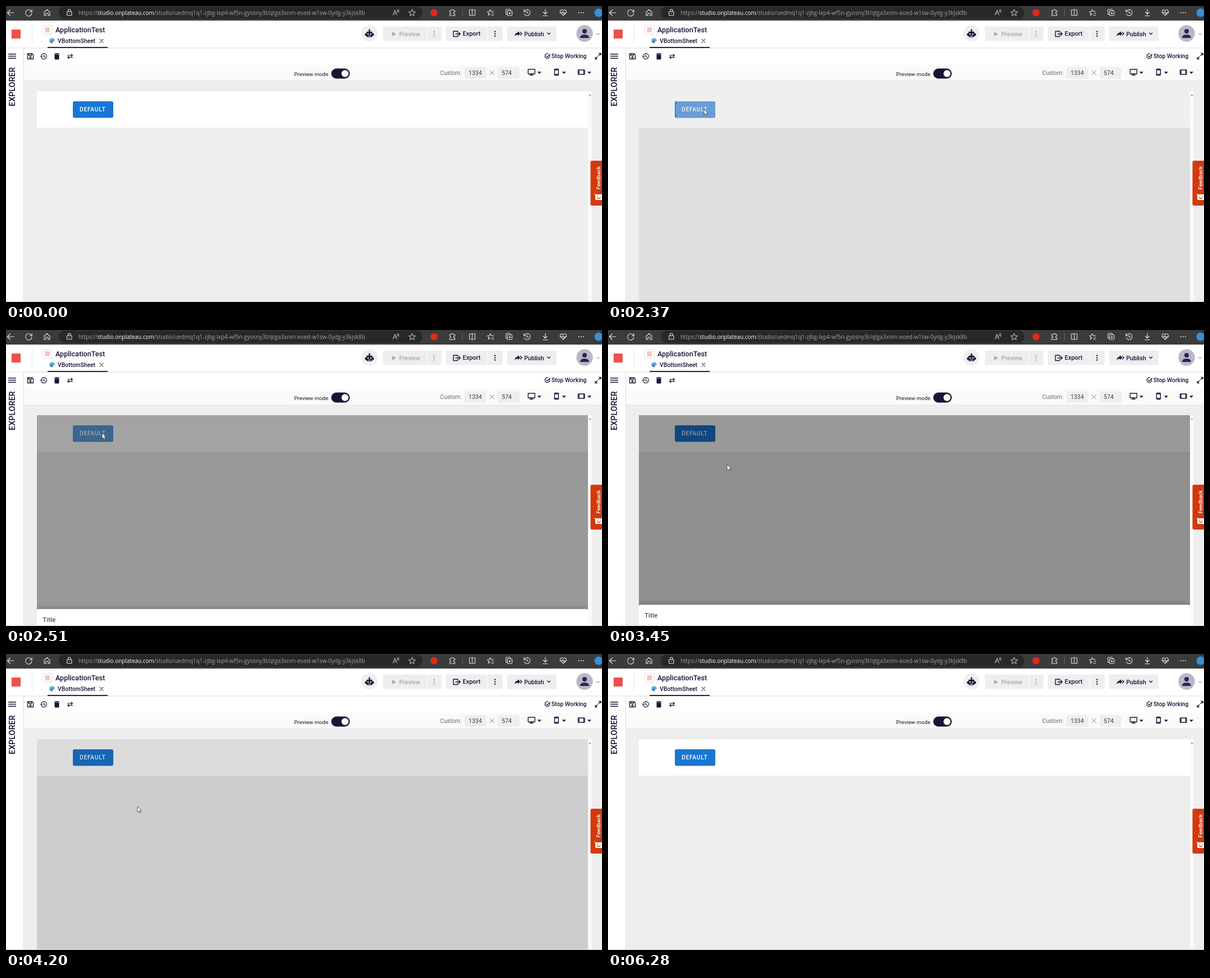
Animation of 1061x528 px, one loop 6410 ms. Source, as an HTML page:

```html
<!DOCTYPE html>
<html lang="en">
<head>
<meta charset="utf-8">
<title>Bottom sheet preview</title>
<style>
html, body { margin: 0; width: 100%; height: 100%; overflow: hidden; background: #eee; }
svg { display: block; width: 1061px; height: 528px; }
text { font-family: Roboto, sans-serif; fill: #1d1235; white-space: pre; }
.m { font-weight: 500; }
.url { font: 9.92px "Open Sans", sans-serif; fill: #a3a3a3; }
.line { fill: none; stroke-linecap: round; stroke-linejoin: round; }
.bar { stroke: #e4e4e4; stroke-width: 1.1; }
.ink { stroke: #1d1235; stroke-width: 1.4; }
</style>
</head>
<body>
<svg viewBox="0 0 1061 528">
  <defs>
    <clipPath id="btnClip"><rect x="119" y="170" width="72" height="29.5" rx="3"/></clipPath>
    <clipPath id="pageClip"><rect x="55" y="152" width="981" height="376"/></clipPath>
    <path id="star" d="M0-6 1.7-1.9 6-1.7 2.7 1.2 3.8 5.4 0 3-3.8 5.4-2.7 1.2-6-1.7-1.7-1.9Z"/>
    <path id="down" d="M-3.5-1.7H3.5L0 2Z" fill="#1d1235"/>
    <g id="dots"><circle cy="-4" r="1.2"/><circle r="1.2"/><circle cy="4" r="1.2"/></g>
  </defs>

  <!-- browser bar -->
  <rect width="1061" height="26" fill="#3b3b3b"/>
  <rect x="94" y="1" width="647" height="22" rx="11" fill="#282828"/>
  <g class="line bar">
    <path d="M3 12H14M7.5 7 2.5 12 7.5 17"/>
    <path d="M45.6 10.2A5.6 5.6 0 1 0 46 12.6M46.2 6.5V10.2H42.5"/>
    <path d="M68 11 73 6.4 78 11V17H75V13H71V17H68Z"/>
    <rect x="108.5" y="10" width="8.5" height="6.8" rx="1"/>
    <path d="M110.5 10V8.2A2.2 2.2 0 0 1 115 8.2V10M112.7 13V13.4"/>
    <path d="M689 16 692.5 7.5 696 16M690.3 13H694.8M696.5 7.5Q698 9 696.8 10.8M698 6Q700.2 8.6 698.6 11.4" stroke="#bbb"/>
    <use href="#star" x="723" y="12" stroke="#bbb"/>
    <path d="M790 8H793Q793 6 794.7 6T796.4 8H799V11Q796.8 11 796.8 12.6T799 14.2V17H790V14Q792 14 792 12.5T790 11Z"/>
    <path d="M812.5 6V18" stroke="#666"/>
    <path d="M828.5 7H825V16.5H828.5M831.5 7H835V16.5H831.5M830 5.5V18"/>
    <path d="M861.5 14 858.8 16.6 859.7 12.8 857 10.2 860.5 9.8 862 6.5 863.5 9.8H868M865 13H868M864 16.2H868"/>
    <path d="M892 15.5 890 14V7.5Q890 6 891.5 6H897L898.5 8"/>
    <rect x="892.5" y="8.5" width="8.5" height="8.5" rx="1.5"/>
    <path d="M896.8 10.8V14.8M894.8 12.8H898.8"/>
    <path d="M922.6 10.2A5.4 5.4 0 1 1 922.8 14M922 6.5V10.2H925.6M927.6 9V12.5H930.4"/>
    <path d="M960 6V14M956.5 11 960 14.5 963.5 11M956 17.5H964"/>
    <path d="M992 17 987 11.8A3 3 0 0 1 992 8.2 3 3 0 0 1 997 11.8ZM986 12H990L991.5 10 993 14 994.2 12H998"/>
  </g>
  <g fill="#e4e4e4"><circle cx="1020" cy="12" r="1"/><circle cx="1024" cy="12" r="1"/><circle cx="1028" cy="12" r="1"/></g>
  <circle cx="762" cy="12" r="6.3" fill="#e02a1a"/>
  <circle cx="1055" cy="12" r="7.5" fill="#3191dc"/>
  <text class="url" x="129" y="15.5">https://<tspan fill="#fff">studio.onplateau.com</tspan>/studio/uedmq1q1-zjbg-lxp4-wf5n-gyosny3t/qtga3xnm-eoed-w1sw-0ydg-y3kjsk8b</text>

  <!-- header -->
  <rect y="26" width="1061" height="79" fill="#fff"/>
  <rect y="74.5" width="1061" height="1" fill="#d9d9d9"/>
  <rect x="10" y="42" width="16" height="16" fill="#ee504b"/>
  <rect x="46" y="33" width="1" height="33" fill="#e2e2e2"/>
  <rect x="65.5" y="34.500" width="16.500" height="16" rx="2" fill="#fff" stroke="#dedede"/>
  <rect x="69.500" y="38" width="8.500" height="9" fill="#f7c5bd"/>
  <text class="m" x="88" y="47.300" font-size="12.600">ApplicationTest</text>
  <path d="M82 57.500A4.500 4.500 0 1 0 82 66.500Q83.600 66.300 83 64.600 83 63.600 84.200 63.600 86.600 63.600 86.600 61.200 86 57.500 82 57.500Z" fill="#3288c6"/>
  <g fill="#fff"><circle cx="79.700" cy="61.600" r=".8"/><circle cx="81" cy="59.500" r=".8"/><circle cx="83.200" cy="59.500" r=".8"/><circle cx="84.700" cy="61.400" r=".8"/></g>
  <text class="m" x="92" y="65.800" font-size="10.300">VBottomSheet</text>
  <path class="line" d="M167 59.200 173 65.200M173 59.200 167 65.200" stroke="#444" stroke-width="1.100"/>
  <rect x="74" y="73" width="107" height="1.800" fill="#15102a"/>

  <circle cx="647" cy="49" r="14.500" fill="#efeef1"/>
  <g fill="#1d1235">
    <rect x="641.500" y="45.500" width="11" height="10" rx="2.500"/>
    <rect x="639" y="49" width="16" height="4" rx="1"/>
    <rect x="646.300" y="42.500" width="1.400" height="4"/><circle cx="647" cy="43" r="1.600"/>
  </g>
  <g fill="#fff"><circle cx="644.600" cy="50" r="1.300"/><circle cx="649.400" cy="50" r="1.300"/><rect x="644.500" y="53" width="5" height="1"/></g>

  <g fill="#eeedef">
    <path d="M674 36.500H749V62.500H674Q671 62.500 671 59.500V39.500Q671 36.500 674 36.500ZM750 36.500H772Q775 36.500 775 39.500V59.500Q775 62.500 772 62.500H750Z"/>
    <path d="M786 36.500H857V62.500H786Q783 62.500 783 59.500V39.500Q783 36.500 786 36.500ZM858 36.500H881Q884 36.500 884 39.500V59.500Q884 62.500 881 62.500H858Z"/>
    <rect x="892" y="36.500" width="88" height="26" rx="3"/>
  </g>
  <path d="M687.500 46V54L694.500 50Z" fill="#a9a7ae"/>
  <text class="m" x="700" y="53.500" font-size="10.500" style="fill:#a9a7ae">Preview</text>
  <use href="#dots" x="762" y="49.500" fill="#a9a7ae"/>
  <path class="line ink" d="M804 47V45H796.500V54.500H804V52.500M800.500 49.700H808.500M806 47 808.700 49.700 806 52.400"/>
  <text class="m" x="813" y="53.200" font-size="10.900">Export</text>
  <use href="#dots" x="870.500" y="49.500" fill="#1d1235"/>
  <path d="M911 45V47.500Q906 48 905.500 54 907.500 51 911 51V53.500L915.500 49.300ZM915 45.500V47L917.300 49.300 915 51.700V53.200L919.500 49.300Z" fill="#1d1235"/>
  <text class="m" x="922.500" y="53.500" font-size="10.600">Publish</text>
  <path class="line ink" d="M963.800 48 966.300 50.500 968.800 48" style="stroke-width:1.200"/>
  <circle cx="1030" cy="49" r="14.700" fill="#bab7c8"/>
  <g fill="#2b2350"><circle cx="1030" cy="45" r="4"/><path d="M1022 57Q1022 51 1030 51T1038 57Z"/></g>
  <path class="line" d="M1051.500 48.500 1054 51 1056.500 48.500" stroke="#777"/>

  <!-- toolbars -->
  <rect x="32" y="105" width="1029" height="29" fill="#fafaf9"/>
  <rect x="32" y="133.500" width="1029" height="1" fill="#e2e2e2"/>
  <g class="line ink">
    <path d="M38.500 85H46.500L48.500 87V94.500H38.500ZM40.500 85V88H45.500V85"/><circle cx="43.500" cy="91.500" r="1.300"/>
    <path d="M62.700 88A5 5 0 1 1 63.300 92.600M61.500 89.500 63 91 65 89M67.500 87V90L69.800 91.500" style="stroke-width:1.200"/>
    <path d="M109.500 88H118M116 86 118.300 88 116 90M118.500 91.700H110M112 89.700 109.700 91.700 112 93.700" style="stroke-width:1.200"/>
    <path d="M967.600 87.600A4.300 4.300 0 1 1 965 85.200M961.700 89 963.600 91 968.400 86" style="stroke-width:1.200"/>
    <path d="M1055 88.500 1059 84.500M1055.800 84.500H1059V87.700M1053 90.500 1049 94.500M1049 91.300V94.500H1052.200" style="stroke-width:1.300"/>
  </g>
  <path d="M86.500 86.500H94.500V94Q94.500 95.500 93 95.500H88Q86.500 95.500 86.500 94ZM86 84.700H88.800L89.400 84H91.600L92.200 84.700H95V86H86Z" fill="#1d1235"/>
  <text class="m" x="971" y="93.200" font-size="10.450">Stop Working</text>

  <text x="513" y="124.700" font-size="9.700">Preview mode</text>
  <rect x="579" y="111.500" width="33" height="18" rx="9" fill="#1d1235"/>
  <circle cx="603.500" cy="120.500" r="6.200" fill="#fff"/>
  <text x="773" y="123.200" font-size="10.200" style="fill:#6a6772">Custom:</text>
  <g fill="#efeeef"><rect x="816" y="109.500" width="39" height="20" rx="2"/><rect x="875" y="109.500" width="39" height="20" rx="2"/></g>
  <text x="823.500" y="123.200" font-size="10.500" style="fill:#3d3a45">1334</text>
  <text x="882.500" y="123.200" font-size="10.500" style="fill:#3d3a45">574</text>
  <path class="line" d="M861 115 869 123M869 115 861 123" stroke="#8a8890"/>
  <g class="line ink">
    <rect x="929.500" y="113" width="12" height="8"/><path d="M935.500 121V123M932.500 123.300H938.500"/>
    <rect x="976.500" y="112.500" width="7" height="11" rx="1"/><path d="M976.500 114H983.500M976.500 122H983.500"/>
    <rect x="1018.500" y="114" width="11.500" height="8" rx="1"/><path d="M1020 114V122M1028.600 114V122"/>
  </g>
  <use href="#down" x="949.500" y="119"/><use href="#down" x="993.500" y="119"/><use href="#down" x="1038.500" y="119"/>

  <!-- sidebar -->
  <rect y="75.500" width="31" height="453" fill="#fff"/>
  <rect x="31" y="75.500" width="1" height="453" fill="#dcdcdc"/>
  <path d="M4 85.700H18M4 89.500H18M4 93.300H18" stroke="#1d1235" stroke-width="1.600"/>
  <text class="m" transform="translate(16.300 179) rotate(-90)" font-size="14.400">EXPLORER</text>

  <!-- page -->
  <rect x="32" y="134.500" width="1029" height="394" fill="#eee"/>
  <rect x="55" y="152" width="981" height="65" fill="#fff"/>
  <rect x="1036" y="152" width="7" height="376" fill="#fafafa"/>
  <path d="M1037 160H1042L1039.500 157Z" fill="#a3a3a3"/>
  <rect x="119" y="170" width="72" height="29.500" rx="3" fill="#1976d2"/>
  <g clip-path="url(#btnClip)"><g transform="translate(172 185)"><circle id="ripple" r="1" fill="#fff" opacity="0"/></g></g>
  <text class="m" x="131" y="188.200" font-size="10.300" letter-spacing=".7" style="fill:#fff">DEFAULT</text>
  <rect id="scrim" x="55" y="152" width="981" height="376" opacity="0"/>
  <g clip-path="url(#pageClip)">
    <g id="sheet" transform="translate(0 100)">
      <rect x="55" y="490" width="981" height="100" rx="3" fill="#fff" style="filter:drop-shadow(0 0 5px #0005)"/>
      <text x="65" y="512.700" font-size="11.760" letter-spacing=".08" style="fill:#212121">Title</text>
    </g>
  </g>
  <rect y="527" width="1061" height="1" fill="#cbcbcb"/>

  <!-- feedback tab -->
  <path d="M1061 276H1043.500Q1040.500 276 1040.500 279V353Q1040.500 356 1043.500 356H1061Z" fill="#d4380d"/>
  <text transform="translate(1058.300 327.300) rotate(-90)" class="m" font-size="9.600" style="fill:#fff">Feedback</text>
  <path d="M1047.500 334.500 1050 336H1061V346H1051Q1049 346 1049 344V338Z" fill="#fff"/>
  <path class="line" d="M1052.500 339V339.500M1058 339V339.500M1052.500 342Q1055.200 344.500 1058 342" stroke="#d4380d" stroke-width="1.200"/>

  <path id="cursor" d="M0 0V10L2.300 8 4 11.600 5.700 10.800 4.100 7.300H7.200Z" fill="#fff" stroke="#333" stroke-width=".8" transform="translate(-20 -20)"/>
</svg>
<script>
const LOOP = 6410;
const EASE = 'cubic-bezier(.4,0,.2,1)';
const $ = id => document.getElementById(id);

// rows: [ms, value, easing up to the next row]
function play(id, prop, rows) {
  const frames = [[0, rows[0][1]], ...rows, [LOOP, rows[rows.length - 1][1]]]
    .map(([ms, value, easing = 'linear']) => ({ offset: ms / LOOP, [prop]: value, easing }));
  $(id).animate(frames, { duration: LOOP, iterations: Infinity }).startTime = 0 + start;
}
const start = document.timeline.currentTime || 0;

// pointer: [ms, x, y, jumps up to the next row]
const path = [
  [0, -20, -20, 1],
  [390, 972, 516, 5], [740, 430, 282, 4],
  [1020, 276, 220, 5], [1360, 198, 194, 4], [1640, 171, 184, 1],
  [3100, 171, 184, 5], [3450, 212, 240, 4], [3740, 234, 272, 1],
  [4400, 234, 272, 3], [4600, 260, 313, 5], [4950, 413, 496, 1],
  [5020, -20, -20, 1]
];
play('cursor', 'transform', path.map(([ms, x, y, n]) => [ms, `translate(${x}px,${y}px)`, `steps(${n})`]));

play('scrim', 'opacity', [[2300, 0, EASE], [2630, .4], [4040, .4, EASE], [4420, 0]]);

const shift = y => `translate(0px,${y}px)`;
play('sheet', 'transform', [
  [2300, shift(80), EASE], [2630, shift(0)], [4040, shift(0), EASE], [4420, shift(80)]
]);

play('ripple', 'transform', [[2030, 'scale(5)'], [2370, 'scale(52)'], [2440, 'scale(75)']]);
play('ripple', 'opacity', [[2030, 0], [2170, .38], [2370, .38], [2510, .3], [2770, 0]]);
</script>
</body>
</html>
```
